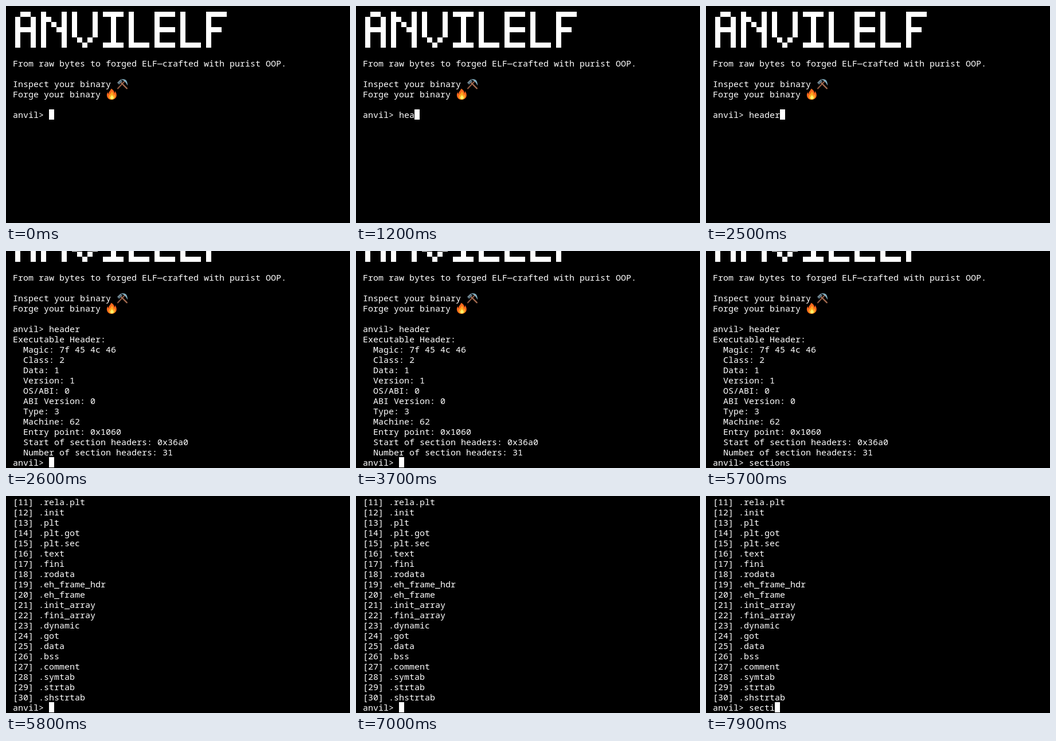
Animation of 600x380 px, one loop 8000 ms. Source, as an HTML page:

```html
<!DOCTYPE html>
<html lang="en">
<head>
<meta charset="utf-8">
<title>Terminal session</title>
<style>
  html, body { margin: 0; width: 100%; height: 100%; overflow: hidden; background: #000; }
  svg { display: block; width: 600px; height: 380px; overflow: hidden; background: #000; }
  text { font: 15px "Noto Sans Mono", "DejaVu Sans Mono", monospace; fill: #fff; white-space: pre; }
</style>
</head>
<body>
<svg viewBox="0 0 600 380">
  <g id="page">
    <g id="banner" fill="#fff" shape-rendering="crispEdges"></g>
    <g id="hammer" transform="translate(192 126)" fill="none" stroke-linecap="round">
      <path d="M3 18.5L15.5 5" stroke="#8d5a43" stroke-width="2.2"/>
      <path d="M18.8 18.3L7 6.5" stroke="#a1694e" stroke-width="2.4"/>
      <path d="M8 2Q15.5 1.5 17.6 4.2Q20 7 20 13.5Q17.8 8.6 15.4 6.4Q12.6 3.6 8 2Z" fill="#82aec0" stroke="none"/>
      <path d="M3.6 10L9.6 4.2" stroke="#5d7480" stroke-width="4.6" stroke-linecap="butt"/>
      <path d="M2.8 8.6L8 3.6" stroke="#8299a5" stroke-width="1.2" stroke-linecap="butt"/>
    </g>
    <g id="fire" transform="translate(174 144)">
      <path d="M9.2 .8C8.6 4.6 4.7 5.8 5.1 10C3.9 9.3 3.7 7.8 3.9 6.6C1.8 9 1.5 12 2.2 14.4C3.3 18 6.5 20 10.2 20C15 20 18.7 16.8 18.8 12.2C18.9 9.2 17.4 7 16.6 5.1C16 6.2 16.3 7.6 15.4 8.6C14.6 4.9 12.6 2 9.2 .8Z" fill="#f7661c"/>
      <path d="M10.4 5.2C10.4 8.8 6.2 10.6 5.4 13.8C4.6 17.2 7 19.6 10.4 19.6C14 19.6 16.5 17.2 16.3 13.9C16.2 12.4 15.6 11.2 14.8 10.2C14.6 11.2 14.2 12 13.4 12.4C13.6 9.6 12.4 6.8 10.4 5.2Z" fill="#ffa61f"/>
      <path d="M10.6 11.2C10.5 13.4 8 14.3 7.9 16.6C7.9 18.5 9.2 19.4 10.8 19.4C12.6 19.4 13.9 18.3 13.8 16.6C13.7 14.2 11.4 13.6 10.6 11.2Z" fill="#fff068"/>
    </g>
    <g id="lines"></g>
    <rect id="cursor" width="9" height="18" fill="#fff"/>
  </g>
</svg>
<script>
const NS = "http://www.w3.org/2000/svg";
const CELL = 9, ROW = 18, LEFT = 12, TOP = 1, LOOP = 8000;
const PROMPT = "anvil> ";
const $ = id => document.getElementById(id);

function add(parent, tag, attrs) {
  const el = document.createElementNS(NS, tag);
  for (const key in attrs) el.setAttribute(key, attrs[key]);
  return parent.appendChild(el);
}

// Block letters: seven rows each, separated by "/"
const GLYPHS = {
  A: ".##./#..#/#..#/####/#..#/#..#/#..#",
  N: "#...#/##..#/#.#.#/#..##/#...#/#...#/#...#",
  V: "#...#/#...#/#...#/#...#/#...#/.#.#./..#..",
  I: "####/|.../|.../|.../|.../|.../####",
  L: "#.../#.../#.../#.../#.../#.../####",
  E: "####/#.../#.../####/#.../#.../####",
  F: "####/#.../#.../###./#.../#.../#..."
};

function drawBanner(word) {
  let left = 16;
  for (const letter of word) {
    const rows = GLYPHS[letter].split("/");
    rows.forEach((row, r) => [...row].forEach((dot, c) => {
      if (dot === ".") return;
      const shift = dot === "|" ? 14 : 0; // centred stem
      add($("banner"), "rect", { x: left + c * CELL + shift, y: 10 + r * CELL, width: CELL, height: CELL });
    }));
    left += (rows[0].length + 1) * CELL;
  }
}

const intro = ["", "", "", "", "",
  "From raw bytes to forged ELF\u2014crafted with purist OOP.", "",
  "Inspect your binary", "Forge your binary", ""];

const header = ["Executable Header:",
  ...["Magic: 7f 45 4c 46", "Class: 2", "Data: 1", "Version: 1", "OS/ABI: 0",
    "ABI Version: 0", "Type: 3", "Machine: 62", "Entry point: 0x1060",
    "Start of section headers: 0x36a0", "Number of section headers: 31"].map(s => "  " + s)];

const sections = ("rela.plt init plt plt.got plt.sec text fini rodata eh_frame_hdr eh_frame " +
  "init_array fini_array dynamic got data bss comment symtab strtab shstrtab")
  .split(" ").map((name, i) => `[${i + 11}] .${name}`);

const log = [...intro, PROMPT + "header", ...header, PROMPT + "sections", ...sections, PROMPT];

// Active prompt line and first visible line of each screen
const screens = [
  { prompt: 10, top: 0 },
  { prompt: 23, top: 3 },
  { prompt: 44, top: 24 }
];

// time, screen, typed text, cursor visible
const steps = [
  [0, 0, "", 1], [300, 0, "", 0], [900, 0, "", 1],
  [1000, 0, "h", 1], [1200, 0, "hea", 1], [1400, 0, "head", 1], [1500, 0, "heade", 1],
  [1800, 0, "header", 1], [2300, 0, "header", 0], [2500, 0, "header", 1],
  [2600, 1, "", 1], [3100, 1, "", 0], [3700, 1, "", 1],
  [4000, 1, "s", 1], [4100, 1, "se", 1], [4400, 1, "sec", 1], [4600, 1, "sect", 1],
  [4700, 1, "secti", 1], [4800, 1, "sectio", 1], [5100, 1, "section", 1],
  [5200, 1, "sections", 1], [5700, 1, "sections", 0],
  [5800, 2, "", 1], [6400, 2, "", 0], [7000, 2, "", 1],
  [7300, 2, "se", 1], [7600, 2, "sec", 1], [7800, 2, "sect", 1], [7900, 2, "secti", 1]
];

drawBanner("ANVILELF");
const lines = log.map((_, i) => add($("lines"), "text", { x: LEFT, y: TOP + i * ROW + 15 }));
let current;

function show(step) {
  const [, id, typed, lit] = step;
  const { prompt, top } = screens[id];
  lines.forEach((el, i) => {
    el.textContent = i < prompt ? log[i] : i === prompt ? PROMPT + typed : "";
  });
  $("page").setAttribute("transform", `translate(0 ${-top * ROW})`);
  $("cursor").setAttribute("x", LEFT + (PROMPT.length + typed.length) * CELL);
  $("cursor").setAttribute("y", TOP + prompt * ROW);
  $("cursor").setAttribute("visibility", lit ? "visible" : "hidden");
}

function tick() {
  const time = (performance.now() - start) % LOOP;
  const step = steps.findLast(s => s[0] <= time) || steps[0];
  if (step !== current) show(current = step);
  requestAnimationFrame(tick);
}

const start = performance.now();
tick();
</script>
</body>
</html>
```
